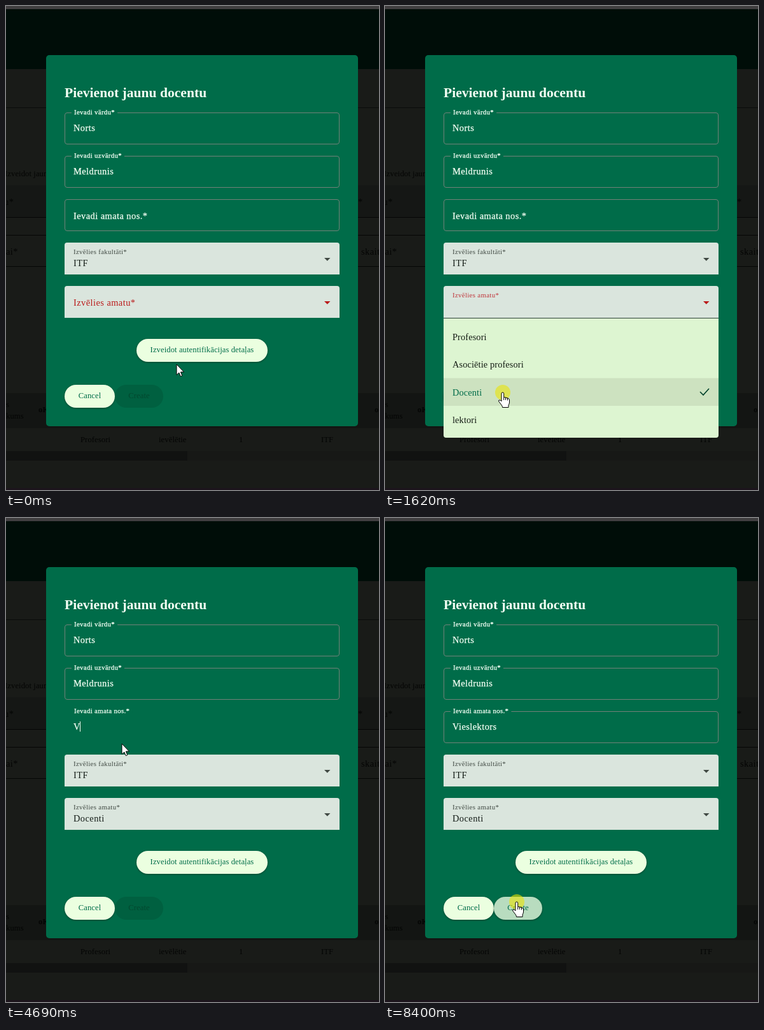
An HTML page with a canvas that plays this animation: 586 px wide and 759 px high, repeating every 8470 ms.

```html
<!DOCTYPE html>
<html lang="lv">
<head>
<meta charset="utf-8">
<title>Pievienot jaunu docentu</title>
<style>
  html, body { margin: 0; width: 100%; height: 100%; overflow: hidden; background: #191b18; }
  canvas { display: block; }
</style>
</head>
<body>
<canvas id="stage" width="586" height="759"></canvas>
<script>
const ctx = document.getElementById('stage').getContext('2d');
const LOOP = 8470;
const GREEN = '#006c49', PALE = '#ebffe0', WHITE = '#f4fff4', GREY = '#404943', RED = '#ba1a1a', SURFACE = '#dae5dd';

// Moments at which the form changes state
const OPEN = 520, CHOOSE = 1680, LEAVE_SELECT = 2500, FOCUS = 2640, ENABLE = 5750, BLUR = 8340;
const CLICKS = [[440, 520], [1620, 1690], [2480, 2650], [8330, LOOP]];
const WORD = 'Vieslektors';
const KEY_TIMES = [4690, 5820, 5950, 6090, 6290, 6560, 6760, 6830, 7030, 7100, 7300];
const OPTIONS = ['Profesori', 'Asociētie profesori', 'Docenti', 'lektori'];
const ROW_TOP = 497, ROW_HEIGHT = 43.3;

// Pointer route: time, x, y
const ROUTE = [
  [0, 268, 562], [70, 268, 562], [270, 208, 400], [420, 203, 468], [560, 203, 468],
  [860, 195, 530], [1000, 183, 634], [1200, 184, 650], [1420, 185, 606], [1640, 185, 606],
  [1760, 206, 467], [2000, 205, 222], [2400, 174, 327], [2650, 174, 327], [2820, 182, 354],
  [7560, 182, 354], [8200, 207, 602], [LOOP, 207, 602]
];

const clamp = v => Math.max(0, Math.min(1, v));
const ease = v => { v = clamp(v); return v * v * (3 - 2 * v); };
const mix = (a, b, k) => a + (b - a) * k;

function pointerAt(t) {
  const i = Math.max(1, ROUTE.findIndex(p => p[0] >= t));
  const [t0, x0, y0] = ROUTE[i - 1], [t1, x1, y1] = ROUTE[i];
  const k = ease((t - t0) / (t1 - t0));
  return { x: mix(x0, x1, k), y: mix(y0, y1, k) };
}

function rect(x, y, w, h, color, radius = 0) {
  ctx.fillStyle = color;
  ctx.beginPath();
  ctx.roundRect(x, y, w, h, radius);
  ctx.fill();
}

function text(str, x, y, size, color, { spacing = 0.1, weight = '', align = 'left', heavy = 0 } = {}) {
  ctx.font = `${weight} ${size}px "Liberation Serif", "Times New Roman", serif`;
  ctx.letterSpacing = spacing + 'px';
  ctx.textAlign = align;
  ctx.fillStyle = color;
  ctx.fillText(str, x, y);
  if (heavy) {
    ctx.strokeStyle = color;
    ctx.lineWidth = heavy;
    ctx.strokeText(str, x, y);
  }
  return ctx.measureText(str).width;
}

// Form text: letter spacing grows with the type size
const formText = (str, x, y, size, color, heavy = 0) => text(str, x, y, size, color, { spacing: size / 32, heavy });

function drawPage() {
  rect(0, 0, 586, 759, '#191b18');
  rect(0, 0, 586, 5, '#403e40');
  rect(0, 5, 586, 94, '#000d08');
  rect(0, 159, 586, 1, '#0a0b0a');
  rect(0, 281, 586, 50, '#151715');
  for (const y of [331, 359, 408]) rect(0, y, 586, 1, '#050605');
  rect(0, 607, 586, 55, '#131513');
  rect(0, 698, 586, 15, '#171816');
  rect(0, 698, 285, 15, '#111211');
  rect(0, 756, 586, 3, '#1c141c');
  const ink = '#040504';
  text('Izveidot jaunu', -2, 267, 12.6, ink);
  formText('u*', -3, 312, 14.4, ink);
  formText('*', 553, 312, 14.4, ink);
  formText('ai*', 0, 390, 14.4, ink);
  formText('skaits', 558, 390, 14.4, ink);
  text('s', 0, 629, 12.6, ink);
  text('kums', 0, 647, 12.6, ink);
  text('oK', 51, 637, 12.6, ink, { weight: 'bold' });
  text('o', 579, 637, 12.6, ink, { weight: 'bold' });
  text('Profesori', 117, 684, 12.6, ink);
  text('ievēlētie', 240, 684, 12.6, ink);
  text('1', 366, 684, 12.6, ink);
  text('ITF', 495, 684, 12.6, ink);
}

function drawField(y, label, value, { float = 1, border = '#728178' } = {}) {
  ctx.strokeStyle = border;
  ctx.lineWidth = 1;
  ctx.beginPath();
  ctx.roundRect(92.5, y + 0.5, 431, 49, 3.5);
  ctx.stroke();
  const size = mix(14.4, 10.8, float);
  if (float > 0.5) {
    ctx.font = '10.8px "Liberation Serif", serif';
    ctx.letterSpacing = '0.34px';
    rect(103, y - 1, ctx.measureText(label).width + 8, 4, GREEN);
  }
  formText(label, mix(106, 107, float), y + mix(31, 3, float), size, WHITE, 0.25);
  return formText(value, 106, y + 29, 14.4, WHITE, 0.25);
}

function drawSelect(y, label, value, { float = 1, color = GREY, arrow = GREY } = {}) {
  rect(92, y, 432, 50, SURFACE, [4, 4, 0, 0]);
  formText(label, 106, y + mix(31, 18, float), mix(14.4, 10.8, float), color);
  formText(value, 106, y + 37, 14.4, '#151d18');
  ctx.fillStyle = arrow;
  ctx.beginPath();
  ctx.moveTo(500, y + 24);
  ctx.lineTo(509.5, y + 24);
  ctx.lineTo(504.8, y + 28.7);
  ctx.fill();
}

function drawButton(x, y, w, label, fill = PALE, ink = GREEN, shadow = 1) {
  ctx.save();
  ctx.shadowColor = `rgba(0,0,0,${0.4 * shadow})`;
  ctx.shadowBlur = 3;
  ctx.shadowOffsetY = 1;
  rect(x, y, w, 36, fill, 18);
  ctx.restore();
  text(label, x + w / 2, y + 21, 12.6, ink, { align: 'center' });
}

function drawCreate(t, p) {
  const enabled = ease((t - ENABLE) / 200);
  if (enabled < 1) drawButton(171, 594, 76, 'Create', '#006040', '#02482f', 0);
  if (enabled > 0) {
    const hover = t > 7600 && p.y > 594 && p.y < 630;
    ctx.globalAlpha = enabled;
    drawButton(171, 594, 76, 'Create', t > 8330 ? '#b8dcbf' : hover ? '#d8f3d3' : PALE);
    ctx.globalAlpha = 1;
  }
}

function drawPanel(t) {
  const alpha = t < CHOOSE ? clamp((t - OPEN) / 110) : 1 - clamp((t - CHOOSE) / 97);
  if (alpha <= 0) return;
  const chosen = t >= CHOOSE - 60;
  const hovered = Math.floor((pointerAt(t - 50).y - ROW_TOP) / ROW_HEIGHT);
  ctx.save();
  ctx.globalAlpha = t < CHOOSE ? alpha : Math.max(0, alpha);
  if (t < CHOOSE) {
    ctx.translate(0, 490);
    ctx.scale(1, mix(0.8, 1, alpha));
    ctx.translate(0, -490);
  }
  rect(92, 490, 432, 187, '#ddf5d1', [0, 0, 4, 4]);
  OPTIONS.forEach((name, i) => {
    const y = ROW_TOP + i * ROW_HEIGHT;
    const picked = chosen && i === 2;
    if (!chosen && i === 0) rect(92, y, 432, ROW_HEIGHT, '#c5d9b6');
    else if (picked || (!chosen && i === hovered)) rect(92, y, 432, ROW_HEIGHT, '#cde2c0');
    text(name, 106, y + 27, 14.4, picked ? GREEN : '#151d15');
  });
  if (chosen) {
    ctx.strokeStyle = '#00402a';
    ctx.lineWidth = 1.6;
    ctx.stroke(new Path2D('M495 605l5 5 9-10'));
  }
  ctx.restore();
}

const ARROW = new Path2D('M0 0V16.5L3.8 13 6.3 18.8 8.8 17.7 6.4 12H11.5Z');
const HAND = new Path2D('M-2 1.8Q-2 0-.2 0T1.7 1.8V7.5L4.5 8 8 9Q10.5 9.8 10.5 12V16Q10 18.5 9 20V23.5H-.5Q-.5 21-2.5 19L-6.3 14Q-7 12-5 12T-2 14Z');
const KNUCKLES = new Path2D('M1.7 7.5v4.5M4.6 8v4M7.5 9v3.5');
const IBEAM = new Path2D('M-3-8H-1Q0-8 0-7 0-8 1-8H3M0-7V7M-3 8H-1Q0 8 0 7 0 8 1 8H3');

const inBand = (y, tops, height) => tops.some(top => y >= top && y < top + height);

function pointerKind({ x, y }, t) {
  if (t > OPEN && t < CHOOSE) return 'hand';
  if (inBand(y, [167, 235, 303], 50)) return 'ibeam';
  if (inBand(y, [371, 439], 50)) return 'hand';
  if (inBand(y, [522], 36) && x > 205) return 'hand';
  if (inBand(y, [594], 36) && x < 247) return 'hand';
  return 'arrow';
}

function drawPointer(p, t) {
  const kind = pointerKind(p, t);
  ctx.save();
  ctx.translate(p.x, p.y);
  if (CLICKS.some(([from, to]) => t >= from && t < to)) {
    ctx.fillStyle = 'rgba(235,228,0,.58)';
    ctx.beginPath();
    ctx.arc(0, 0, 12, 0, 7);
    ctx.fill();
  }
  ctx.lineWidth = 1;
  ctx.lineJoin = 'round';
  ctx.fillStyle = '#fff';
  ctx.strokeStyle = '#000';
  if (kind === 'ibeam') {
    ctx.translate(2, 0);
    ctx.strokeStyle = '#c9d6a0';
    ctx.stroke(IBEAM);
  } else {
    const shape = kind === 'hand' ? HAND : ARROW;
    ctx.fill(shape);
    ctx.stroke(shape);
    if (kind === 'hand') ctx.stroke(KNUCKLES);
  }
  ctx.restore();
}

function drawTitleField(t, p, border) {
  const focused = t >= FOCUS && t < BLUR;
  const typed = WORD.slice(0, KEY_TIMES.filter(k => k <= t).length);
  const float = ease((t - FOCUS) / 150);
  if (focused && !typed) formText('Amata nos.', 106, 332, 14.4, 'rgba(64,73,67,.7)');
  const width = drawField(303, 'Ievadi amata nos.*', typed, { float, border: focused ? GREEN : border });
  const lastInput = Math.max(FOCUS, ...KEY_TIMES.filter(k => k <= t));
  if (focused && Math.floor((t - lastInput) / 530) % 2 === 0) rect(Math.floor(106 + width - 0.5), 319, 1, 16, WHITE);
}

function draw(t) {
  const p = pointerAt(t);
  const panelOpen = t > OPEN && t < CHOOSE;
  const border = top => !panelOpen && p.y >= top && p.y < top + 50 ? WHITE : '#728178';

  drawPage();
  rect(63, 77, 490, 582, GREEN, 5);
  text('Pievienot jaunu docentu', 92, 143, 21.6, WHITE, { weight: 'bold', spacing: 0 });
  drawField(167, 'Ievadi vārdu*', 'Norts', { border: border(167) });
  drawField(235, 'Ievadi uzvārdu*', 'Meldrunis', { border: border(235) });
  drawTitleField(t, p, border(303));

  drawSelect(371, 'Izvēlies fakultāti*', 'ITF');
  const accent = t < CHOOSE ? RED : t < LEAVE_SELECT ? GREEN : GREY;
  drawSelect(439, 'Izvēlies amatu*', t < CHOOSE ? '' : 'Docenti', {
    float: ease((t - OPEN) / 150),
    color: panelOpen ? '#c0353b' : accent,
    arrow: accent
  });
  if (panelOpen) rect(92, 489, 432, 1, '#30423a');

  drawButton(205, 522, 206, 'Izveidot autentifikācijas detaļas');
  drawButton(92, 594, 79, 'Cancel');
  drawCreate(t, p);
  drawPanel(t);
  drawPointer(p, t);
}

const start = performance.now();
function tick() {
  draw((performance.now() - start) % LOOP);
  requestAnimationFrame(tick);
}
tick();
</script>
</body>
</html>
```
